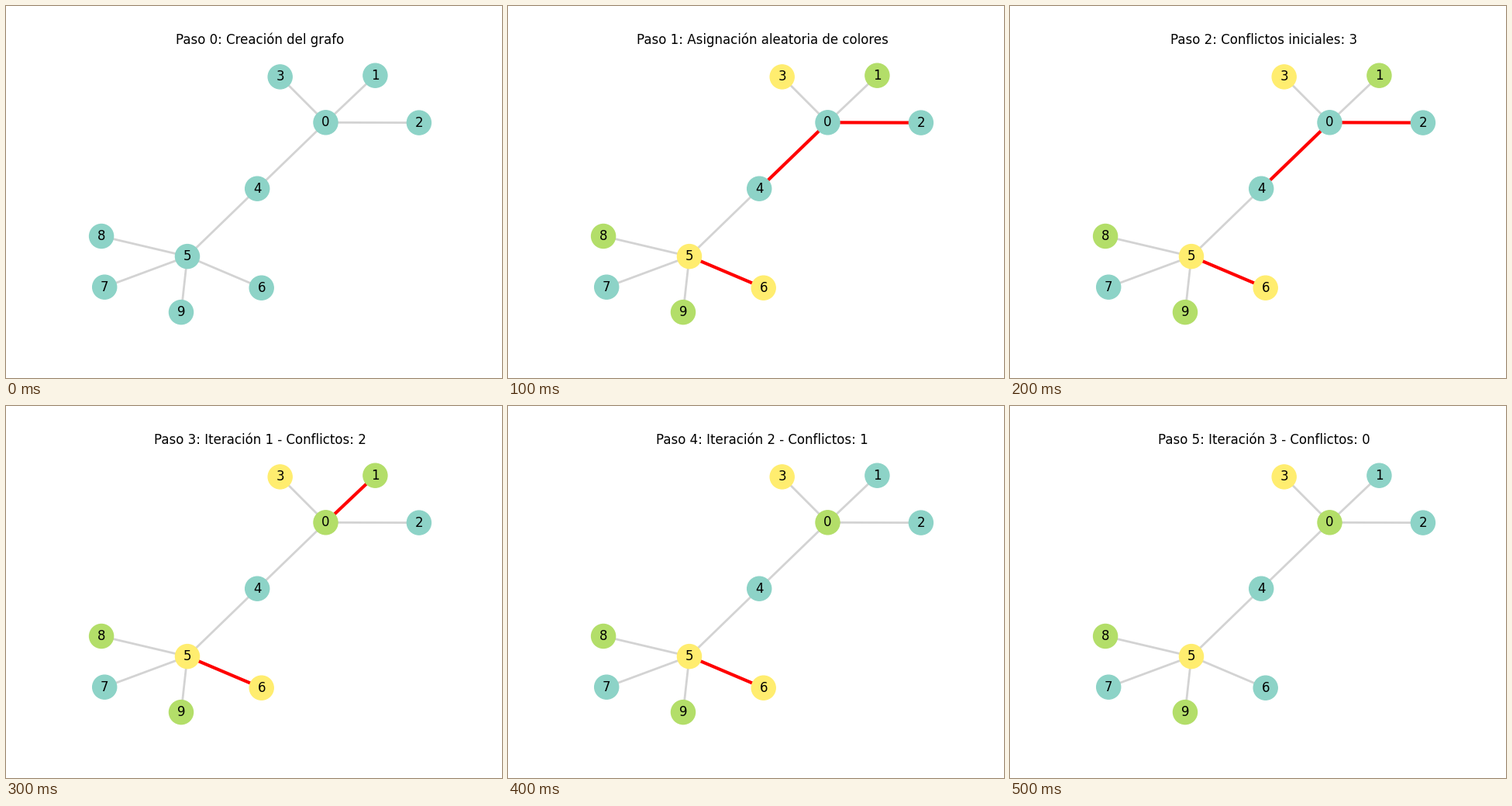
Recreate the animation shown at these times as a matplotlib script. Size 640 by 480 pixels, loop 0.6 s.

```python
import matplotlib.pyplot as plt
from matplotlib.animation import FuncAnimation
from matplotlib.collections import LineCollection

plt.rcParams["font.family"] = "DejaVu Sans"

PALETTE = {"t": "#8dd3c7", "g": "#b3de69", "y": "#ffed6f"}

# Two stars sharing node 4: hub 0 and hub 5
EDGES = [(0, n) for n in range(1, 5)] + [(5, n) for n in range(4, 10) if n != 5]
# Node centres in stage pixels, y pointing down
NODES = [(412.5, 150.3), (476.4, 89.7), (532.9, 150.6), (353.7, 91.4),
         (324.2, 235.7), (234.0, 323.1), (329.7, 363.7), (127.2, 362.7),
         (123.1, 297.0), (226.0, 395.1)]


def neighbours(node):
    return [a + b - node for a, b in EDGES if node in (a, b)]


def repair(coloring):
    """Recolour the first node whose own conflicts can be lowered."""
    for node, old in enumerate(coloring):
        nearby = [coloring[n] for n in neighbours(node)]
        best = min(PALETTE, key=nearby.count)
        if nearby.count(best) < nearby.count(old):
            return coloring[:node] + best + coloring[node + 1:]
    return coloring


def build_steps(initial, iterations=3):
    steps = [("Creación del grafo", "t" * len(initial)),
             ("Asignación aleatoria de colores", initial),
             ("Conflictos iniciales: {}", initial)]
    for i in range(1, iterations + 1):
        steps.append((f"Iteración {i} - Conflictos: {{}}", repair(steps[-1][1])))
    return steps


STEPS = build_steps("tgtytyytgg")

fig, ax = plt.subplots(figsize=(6.4, 4.8), dpi=100)
ax.set(xlim=(80, 576), ylim=(427.2, 57.6))
ax.axis("off")

lines = LineCollection([(NODES[a], NODES[b]) for a, b in EDGES], zorder=1)
ax.add_collection(lines, autolim=False)
dots = ax.scatter(*zip(*NODES), s=500, zorder=2)
for label, (x, y) in enumerate(NODES):
    ax.text(x, y, str(label), size=12, ha="center", va="center", zorder=3)
title = ax.set_title("", fontsize=12)


def draw(step):
    caption, coloring = STEPS[step]
    clashes = [step > 0 and coloring[a] == coloring[b] for a, b in EDGES]
    lines.set_color(["red" if c else "lightgray" for c in clashes])
    lines.set_linewidth([3 if c else 2 for c in clashes])
    dots.set_color([PALETTE[c] for c in coloring])
    title.set_text(f"Paso {step}: " + caption.format(sum(clashes)))
    return lines, dots, title


anim = FuncAnimation(fig, draw, frames=len(STEPS), interval=100,
                     repeat=True, repeat_delay=0)
plt.show()
```
